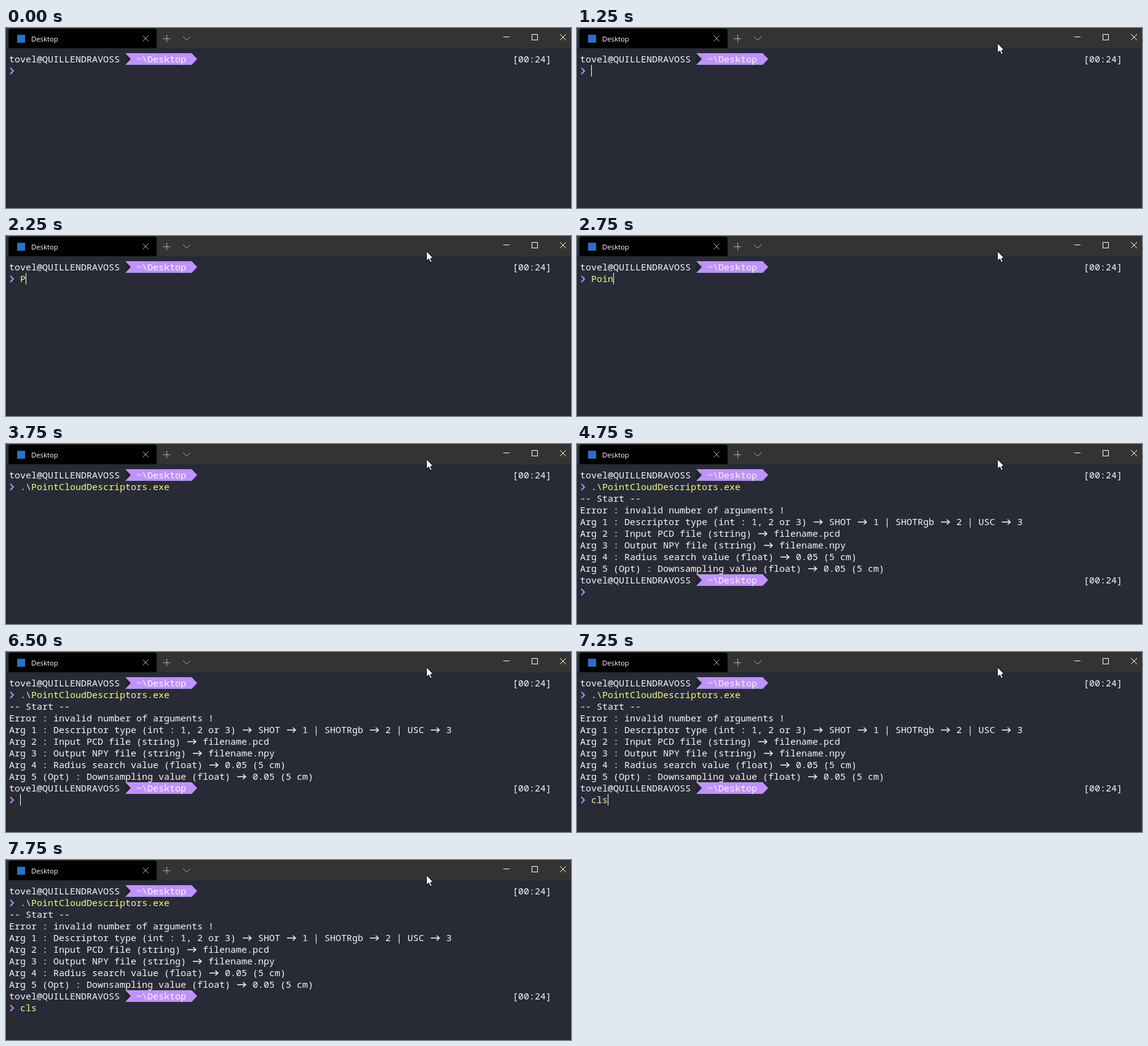
Recreate the animation shown at these times as an HTML page with a canvas. Size 919 by 293 pixels, loop 8 s.

```html
<!DOCTYPE html>
<html lang="en">
<head>
<meta charset="utf-8">
<title>Terminal</title>
<style>
  html, body { margin: 0; width: 100%; height: 100%; overflow: hidden; background: #282a36; }
  canvas { display: block; }
</style>
</head>
<body>
<canvas id="stage" width="919" height="293"></canvas>
<script>
const ctx = document.getElementById('stage').getContext('2d');
const LOOP = 8000, CELL = 9, ROW = 19, LEFT = 5, TOP = 41;
const WHITE = '#f8f8f2', PURPLE = '#bd93f9', YELLOW = '#f1fa8c';
const MONO = '500 15px "Noto Sans Mono", "Liberation Mono", monospace';

const COMMAND = '.\\PointCloudDescriptors.exe';
const OUTPUT = [
  '-- Start --',
  'Error : invalid number of arguments !',
  'Arg 1 : Descriptor type (int : 1, 2 or 3) -> SHOT -> 1 | SHOTRgb -> 2 | USC -> 3',
  'Arg 2 : Input PCD file (string) -> filename.pcd',
  'Arg 3 : Output NPY file (string) -> filename.npy',
  'Arg 4 : Radius search value (float) -> 0.05 (5 cm)',
  'Arg 5 (Opt) : Downsampling value (float) -> 0.05 (5 cm)'
];

// [start time, typed text]
const FIRST_INPUT = [[0, ''], [2250, 'P'], [2500, 'Poi'], [2750, 'Poin'], [3250, COMMAND]];
const SECOND_INPUT = [[4500, ''], [6750, 'c'], [7000, 'cl'], [7250, 'cls']];
// Times at which the caret turns on or off, starting from off
const BLINKS = [1250, 1750, 2250, 3750, 4250, 4750, 5250, 6000, 6500, 7750];

const typedAt = (steps, t) => steps.filter(s => s[0] <= t).pop()[1];
const colX = col => LEFT + col * CELL;
const rowY = row => TOP + row * ROW;

function rect(x, y, w, h, color) {
  ctx.fillStyle = color;
  ctx.fillRect(x, y, w, h);
}

function trace(points, closed) {
  ctx.beginPath();
  points.forEach(([x, y]) => ctx.lineTo(x, y));
  if (closed) ctx.closePath();
}

function polygon(points, color) {
  trace(points, true);
  ctx.fillStyle = color;
  ctx.fill();
}

function line(points, color, width = 1) {
  trace(points);
  ctx.strokeStyle = color;
  ctx.lineWidth = width;
  ctx.stroke();
}

function cross(x, y, r, color) {
  line([[x - r, y - r], [x + r, y + r]], color);
  line([[x - r, y + r], [x + r, y - r]], color);
}

function text(str, col, row, color = WHITE) {
  ctx.font = MONO;
  ctx.fillStyle = color;
  ctx.fillText(str, colX(col), rowY(row) + 15);
}

// Text in which "->" becomes a two-cell arrow
function outputLine(str, row) {
  text(str.replaceAll('->', '  '), 0, row);
  for (const { index } of str.matchAll(/->/g)) {
    const x = colX(index), y = rowY(row) + 10;
    line([[x + 2, y], [x + 15.5, y]], WHITE, 1.5);
    line([[x + 11.5, y - 4], [x + 15.8, y], [x + 11.5, y + 4]], WHITE, 1.5);
  }
}

function prompt(row, input) {
  const y = rowY(row), mid = y + 9.5, end = y + ROW;
  text('tovel@QUILLENDRAVOSS', 0, row);
  polygon([[194, y], [203, mid], [194, end]], '#21222c');
  polygon([[194, y], [302, y], [311, mid], [302, end], [194, end], [203, mid]], PURPLE);
  text('~\\Desktop', 23, row);
  text('[00:24]', 91, row);
  line([[7, y + 24], [12, y + 29], [7, y + 34]], PURPLE, 2);
  text(input, 2, row + 1, YELLOW);
}

function titleBar() {
  rect(0, 0, 919, 33, '#333');
  ctx.fillStyle = '#000';
  ctx.beginPath();
  ctx.roundRect(4, 1, 241, 32, [4, 4, 0, 0]);
  ctx.fill();
  rect(18, 11, 13, 13, '#2f70c0');
  ctx.font = '11.3px "Open Sans", "Noto Sans", sans-serif';
  ctx.fillStyle = '#fff';
  ctx.fillText('Desktop', 41, 22);
  cross(227, 17, 4.5, '#b4b4b4');
  line([[255, 17.5], [267, 17.5]], '#b4b4b4');
  line([[261.5, 11], [261.5, 23]], '#b4b4b4');
  line([[288, 14], [294, 20], [300, 14]], '#b4b4b4');
  line([[809, 14.5], [819, 14.5]], '#fff');
  ctx.strokeStyle = '#fff';
  ctx.strokeRect(855.5, 10.5, 9, 9);
  cross(906, 15, 5, '#fff');
}

function pointer(x, y) {
  const shape = [[0, 0], [0, 16], [3.7, 12.7], [6.3, 18.5], [8.8, 17.4], [6.3, 11.8], [11, 11.8]]
    .map(([dx, dy]) => [x + dx, y + dy]);
  polygon(shape, '#fff');
  ctx.strokeStyle = '#000';
  ctx.lineWidth = 1;
  ctx.stroke();
}

function draw(t) {
  rect(0, 0, 919, 293, '#282a36');
  titleBar();

  let input = typedAt(FIRST_INPUT, t), caretRow = 1, caretCol = 2 + input.length;
  prompt(0, input);
  if (t >= 4250) {
    OUTPUT.forEach((str, i) => outputLine(str, i + 2));
    caretRow = 9;
    caretCol = 0;
  }
  if (t >= 4500) {
    input = typedAt(SECOND_INPUT, t);
    prompt(9, input);
    caretRow = 10;
    caretCol = 2 + input.length;
  }
  if (BLINKS.filter(b => b <= t).length % 2) {
    rect(colX(caretCol), rowY(caretRow), 1, ROW, '#fff');
  }
  if (t >= 1000) pointer(684, 24.5);
  else if (t >= 750) pointer(683, 22.5);
}

const start = performance.now();
function tick() {
  draw((performance.now() - start) % LOOP);
  requestAnimationFrame(tick);
}
tick();
</script>
</body>
</html>
```
